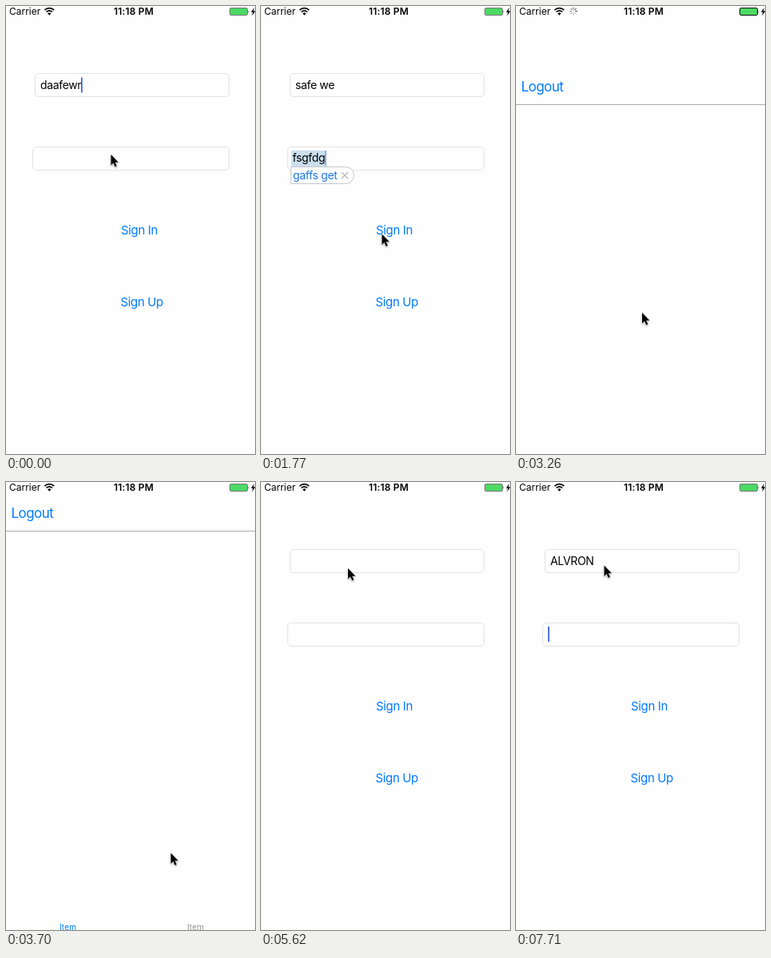
These frames come from a looping animation (312x561 px, 8 s). An HTML page:

```html
<!DOCTYPE html>
<html lang="en">
<head>
<meta charset="utf-8">
<title>Sign in flow</title>
<style>
  html, body { margin: 0; width: 100%; height: 100%; overflow: hidden; background: #fefefe; }
  svg { display: block; width: 312px; height: 561px; font-family: Inter, Roboto, sans-serif; }
  text { white-space: pre; }
  .field { fill: #fefefe; stroke: #e2e2e2; }
  .input { font-size: 14px; letter-spacing: -.35px; }
  .button { font-size: 15px; letter-spacing: -.35px; fill: #007aff; }
  .bar { font-size: 12px; }
  .clock { font-weight: 600; letter-spacing: .2px; text-anchor: middle; }
  .logout { font-size: 17px; letter-spacing: -.55px; fill: #007aff; }
  .tab { font-size: 10px; letter-spacing: .15px; text-anchor: middle; }
</style>
</head>
<body>
<svg viewBox="0 0 312 561">
  <rect width="312" height="561" fill="#fefefe"/>

  <g id="login">
    <rect class="field" x="36.5" y="84.5" width="243" height="29" rx="4.5"/>
    <rect class="field" x="33.5" y="176.5" width="246" height="29" rx="4.5"/>
    <rect id="mark" x="38" y="181" width="44" height="20" fill="#cbdfee"/>
    <text id="user" class="input" x="43" y="104"></text>
    <text id="pass" class="input" x="39.5" y="195"></text>
    <rect id="caret" height="19"/>
    <g id="hint">
      <path d="M37.5 201.5H106a10.5 10.5 0 0 1 0 21H37.5z" fill="#fefefe" stroke="#c6c8cc"/>
      <text class="input" x="40" y="217" fill="#1f77dd">gaffs get</text>
      <path d="M101 208l8 8m0-8l-8 8" stroke="#b4b4b4" stroke-width="1.1"/>
    </g>
    <text class="button" x="144" y="286">Sign In</text>
    <text id="signup" class="button" x="143.5" y="376">Sign Up</text>
  </g>

  <g id="sheet">
    <rect width="312" height="561" fill="#fefefe"/>
    <text id="logout" class="logout" x="6.5" y="45">Logout</text>
    <path d="M0 61.5H312" stroke="#acacac"/>
    <text class="tab" x="77.5" y="561" fill="#007aff">Item</text>
    <text class="tab" x="237.5" y="561" fill="#959595">Item</text>
  </g>

  <g id="status">
    <text class="bar" x="4" y="11">Carrier</text>
    <g fill="none" stroke="#000" stroke-width="1.7">
      <path d="M48.4 5.2a8.2 8.2 0 0 1 11.8 0"/>
      <path d="M50.6 7.5a5.2 5.2 0 0 1 7.4 0"/>
    </g>
    <path d="M54.3 11.7l-2.1-2.4a3 3 0 0 1 4.2 0z"/>
    <g id="spin" stroke-width="1.1" stroke-linecap="round"></g>
    <text class="bar clock" x="160" y="11">11:18 PM</text>
    <rect id="cell" x="280.5" y="2.5" width="22" height="9" rx="1.5" fill="#4cd964"/>
    <path d="M303.5 5.3q1.7 1.7 0 3.6z" fill="#333"/>
    <path d="M311 2l-4 5.7h2.5L308 12.5l4.6-6.3h-2.6z"/>
  </g>

  <path id="pointer" d="M0 0V13.4L3 10.6L5.2 15.6L7.4 14.6L5.2 9.8H9.4Z"
        stroke="#fefefe" stroke-width="1" paint-order="stroke"
        style="filter:drop-shadow(0 1px 1px rgba(0,0,0,.35))"/>
</svg>
<script>
const LOOP = 8000, TICK = 147;
const $ = id => document.getElementById(id);
const BLUE = "#3f66e8", PALE = "#c4c4c4", LILAC = "#8ea6ea";
const NAME = "ALVRON";

const start = {
  user: "daafewr", pass: "", caret: "user", tint: BLUE, hint: false,
  up: 1, out: 1, spin: false, sheet: 561, at: [131.5, 186]
};

// Each step keeps whatever it does not change.
const steps = [
  [150, { at: [131.5, 187] }],
  [300, { caret: "pass" }],
  [600, { user: "safe we" }],
  [890, { pass: "f" }],
  [1030, { pass: "fsg" }],
  [1180, { pass: "fsgfd" }],
  [1330, { pass: "fsgfdg" }],
  [1480, { hint: true, tint: LILAC, at: [133, 199] }],
  [1620, { at: [145, 250] }],
  [1770, { at: [151.5, 285.5] }],
  [1920, { at: [151, 345] }],
  [2070, { at: [150.5, 365] }],
  [2220, { at: [150.5, 370.5] }],
  [2370, { up: .25 }],
  [2520, { up: .7, spin: true }],
  [2670, { up: 1 }],
  [3110, { sheet: 240 }],
  [3260, { sheet: 62, at: [158, 384] }],
  [3410, { sheet: 9, at: [178, 419] }],
  [3550, { sheet: 1, spin: false, at: [198, 452] }],
  [3700, { sheet: 0, at: [206.5, 464.5] }],
  [4140, { at: [198, 432] }],
  [4290, { at: [150, 300] }],
  [4440, { at: [89, 150] }],
  [4590, { at: [48, 68] }],
  [4740, { at: [36.5, 46.5] }],
  [4890, { out: .22 }],
  [5040, { out: .7, sheet: 230, user: "", pass: "", hint: false, caret: "" }],
  [5180, { sheet: 520 }],
  [5330, { sheet: 561, at: [48, 60] }],
  [5480, { at: [82, 91] }],
  [5620, { at: [109, 108] }],
  [5770, { at: [110.5, 104.5] }],
  [6220, { caret: "user", tint: PALE }],
  [6370, { tint: BLUE }],
  ...[...NAME].map((_, i) => [6820 + Math.round(i * 148), { user: NAME.slice(0, i + 1), tint: i ? BLUE : PALE }]),
  [7710, { caret: "pass" }]
];

const spokes = Array.from({ length: 8 }, (_, i) => {
  const line = document.createElementNS("http://www.w3.org/2000/svg", "path");
  line.setAttribute("d", "M0 -2.5V-4.5");
  line.setAttribute("transform", `translate(72 6.5) rotate(${i * 45})`);
  $("spin").append(line);
  return line;
});

const show = (id, on) => $(id).style.display = on ? "" : "none";
const move = (id, x, y) => $(id).setAttribute("transform", `translate(${x} ${y})`);

function setText(id, value) {
  if ($(id).textContent !== value) $(id).textContent = value;
}

function placeCaret(s) {
  show("caret", s.caret);
  if (!s.caret) return;
  const field = $(s.caret), caret = $("caret");
  const width = s[s.caret] ? field.getComputedTextLength() : 0;
  caret.setAttribute("x", Math.round(+field.getAttribute("x") + width));
  caret.setAttribute("y", s.caret === "user" ? 89.5 : 181);
  caret.setAttribute("width", s.tint === PALE ? 1 : 1.8);
  caret.setAttribute("fill", s.tint);
}

function draw(t) {
  const s = Object.assign({}, start, ...steps.filter(step => step[0] <= t).map(step => step[1]));
  setText("user", s.user);
  setText("pass", s.pass);
  placeCaret(s);
  show("hint", s.hint);
  show("mark", s.hint);
  show("spin", s.spin);
  $("cell").setAttribute("stroke", s.spin ? "#111" : "#777");
  const turn = Math.floor(t / TICK);
  spokes.forEach((line, i) => {
    const age = (turn * 3 - i + 80) % 8;
    line.setAttribute("stroke", `rgba(0,0,0,${.75 - age * .08})`);
  });
  $("signup").style.opacity = s.up;
  $("logout").style.opacity = s.out;
  show("sheet", s.sheet < 561);
  move("sheet", 0, s.sheet);
  move("pointer", ...s.at);
}

const begin = performance.now();
function frame() {
  draw((performance.now() - begin) % LOOP);
  requestAnimationFrame(frame);
}
frame();
</script>
</body>
</html>
```
